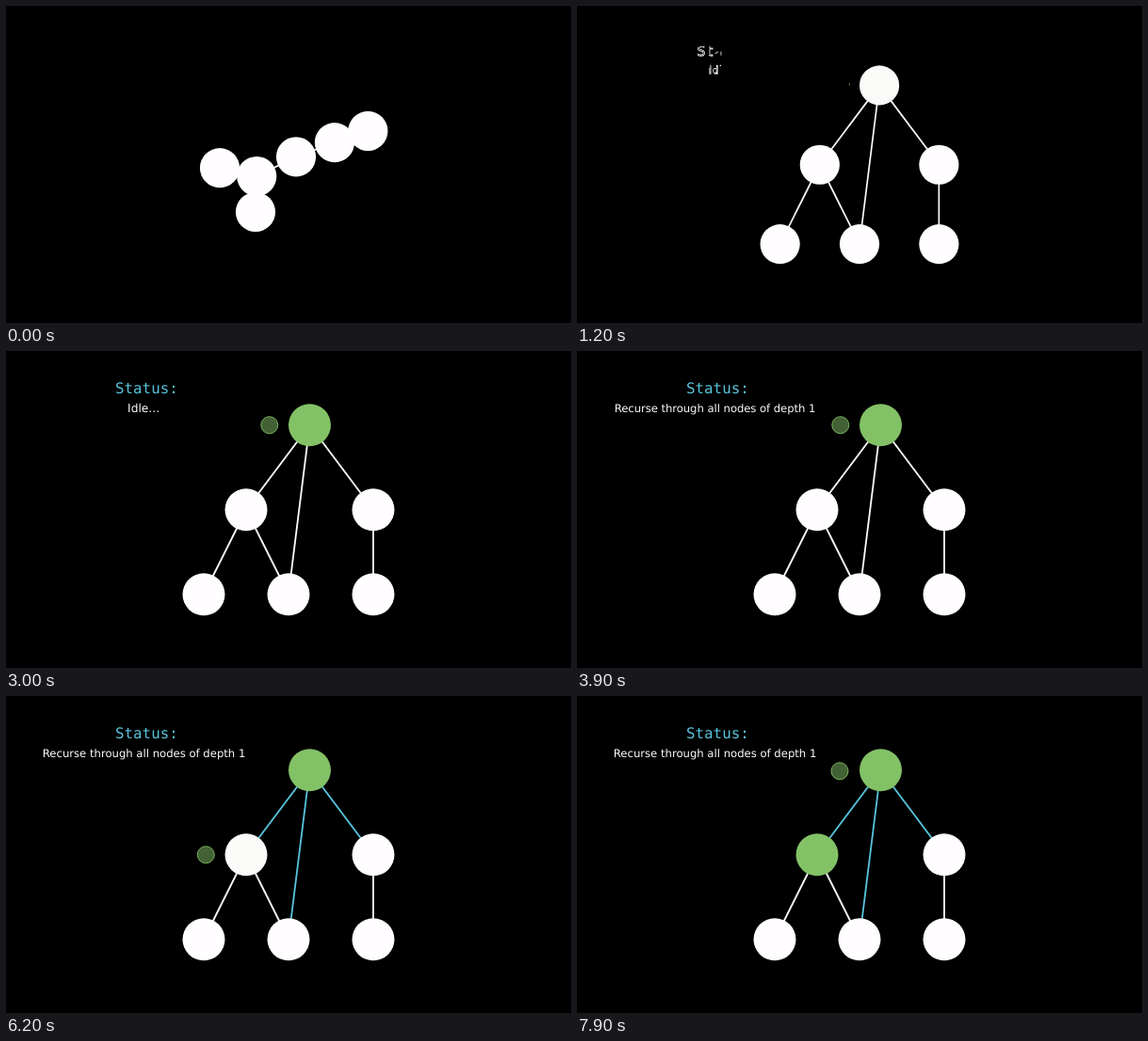
Recreate the animation shown at these times as an HTML page with a canvas. Size 600 px wide and 337 px high, loop 8 s.

```html
<!DOCTYPE html>
<html lang="en">
<head>
<meta charset="utf-8">
<title>Depth-first search</title>
<style>
  html, body { margin: 0; width: 100%; height: 100%; overflow: hidden; background: #000; }
  canvas { display: block; width: 600px; height: 337px; }
</style>
</head>
<body>
<canvas id="stage"></canvas>
<script>
const LOOP = 8000;
const UNIT = 42.1875;
const WHITE = [255, 253, 255], GREEN = [131, 193, 103], BLUE = [88, 196, 221];
const MONO = '"DejaVu Sans Mono", monospace';
const SANS = '"DejaVu Sans", sans-serif';

const canvas = document.getElementById('stage');
const ctx = canvas.getContext('2d');
const dpr = window.devicePixelRatio || 1;
canvas.width = Math.round(600 * dpr);
canvas.height = Math.round(337 * dpr);

// Node: start and end position in units, y up.
const nodes = {
  root:  { from: [0.19, 0.20],   to: [0.5, 2] },
  left:  { from: [-0.80, -0.29], to: [-1, 0] },
  right: { from: [1.16, 0.56],   to: [2, 0] },
  leafA: { from: [-1.73, -0.08], to: [-2, -2] },
  leafB: { from: [-0.83, -1.19], to: [0, -2] },
  leafC: { from: [2.0, 0.85],    to: [2, -2] }
};
const edges = [
  ['left', 'leafA'], ['left', 'leafB'], ['right', 'leafC'],
  ['root', 'left'], ['root', 'right'], ['root', 'leafB']
];

const clamp = v => Math.min(1, Math.max(0, v));
const mix = (a, b, p) => a + (b - a) * p;
const mixAll = (a, b, p) => a.map((v, i) => mix(v, b[i], p));
const rgb = (c, alpha = 1) => `rgba(${c.map(Math.round).join(',')},${alpha})`;

const sigmoid = x => 1 / (1 + Math.exp(-x));
const EDGE = sigmoid(-5);
const smooth = p => clamp((sigmoid(10 * (p - 0.5)) - EDGE) / (1 - 2 * EDGE));

// Progress of a one-second step that begins at the given second.
const linear = (t, second) => clamp(t / 1000 - second);
const step = (t, second) => smooth(linear(t, second));

function makeText(str, size, family, x, y, color) {
  const font = `${size}px ${family}`;
  ctx.font = font;
  const glyphs = [];
  [...str].forEach((ch, i) => {
    if (ch === ' ') return;
    const w = ctx.measureText(ch).width;
    const end = ctx.measureText(str.slice(0, i + 1)).width;
    glyphs.push({ ch, w, x: x + end - w });
  });
  return { str, size, font, x, y, color, glyphs };
}

ctx.textRendering = 'geometricPrecision';
const title = makeText('Status:', 14.85, MONO, -172.5, -115.8, BLUE);
const idle = makeText('Idle...', 11.5, SANS, -160.3, -97, WHITE);
const task = makeText('Recurse through all nodes of depth 1', 10.92, SANS, -244.9, -97, WHITE);

function drawText(text) {
  ctx.font = text.font;
  ctx.fillStyle = rgb(text.color);
  ctx.fillText(text.str, text.x, text.y);
}

// Outline each letter in turn, then let it fill.
const outline = { I: 1.7, l: 1.7, '.': 0.5, ':': 0.5 };
function writeText(text, p) {
  if (p <= 0) return;
  if (p >= 1) return drawText(text);
  const span = 1 + 0.2 * (text.glyphs.length - 1);
  ctx.font = text.font;
  ctx.lineWidth = 0.8;
  text.glyphs.forEach((g, i) => {
    const a = clamp(p * span - 0.2 * i);
    if (a <= 0) return;
    const fill = clamp(2 * a - 1);
    const length = (outline[g.ch] || 3.2) * text.size;
    ctx.setLineDash(a < 0.5 ? [2 * a * length, 1000] : []);
    ctx.strokeStyle = rgb(WHITE, 1 - fill);
    ctx.strokeText(g.ch, g.x, text.y);
    ctx.fillStyle = rgb(text.color, fill);
    ctx.fillText(g.ch, g.x, text.y);
  });
  ctx.setLineDash([]);
}

// Letters of one line spread out and turn into those of another.
function morphText(a, b, p) {
  if (p <= 0) return drawText(a);
  if (p >= 1) return drawText(b);
  let last = -1;
  b.glyphs.forEach((g, i) => {
    const index = Math.floor(i * a.glyphs.length / b.glyphs.length);
    const s = a.glyphs[index];
    const cx = mix(s.x + s.w / 2, g.x + g.w / 2, p);
    const y = mix(a.y, b.y, p);
    if (index !== last) {
      ctx.font = a.font;
      ctx.fillStyle = rgb(a.color, 1 - p);
      ctx.fillText(s.ch, cx - s.w / 2, y);
    }
    ctx.font = b.font;
    ctx.fillStyle = rgb(b.color, p);
    ctx.fillText(g.ch, cx - g.w / 2, y);
    last = index;
  });
}

function drawGraph(t) {
  const move = step(t, 0);
  const at = name => {
    const [x, y] = mixAll(nodes[name].from, nodes[name].to, move);
    return [x * UNIT, -y * UNIT];
  };

  ctx.lineWidth = 0.04 * UNIT;
  for (const [a, b] of edges) {
    const extra = a === 'root' && b === 'leafB';
    const color = a === 'root' ? mixAll(WHITE, BLUE, step(t, 4)) : WHITE;
    ctx.strokeStyle = rgb(color, extra ? move : 1);
    ctx.beginPath();
    ctx.moveTo(...at(a));
    ctx.lineTo(...at(b));
    ctx.stroke();
  }

  const visit = { root: step(t, 1), left: step(t, 6) };
  for (const name in nodes) {
    ctx.fillStyle = rgb(mixAll(WHITE, GREEN, visit[name] || 0));
    ctx.beginPath();
    ctx.arc(...at(name), UNIT / 2, 0, 2 * Math.PI);
    ctx.fill();
  }
}

function drawMarker(t) {
  const grow = step(t, 1);
  if (grow <= 0) return;
  const go = step(t, 5) - step(t, 7);
  const [x, y] = mixAll([-0.45, 2], [-1.95, 0], go);
  ctx.beginPath();
  ctx.arc(x * UNIT, -y * UNIT, 0.2 * UNIT, 0, -2 * Math.PI * grow, true);
  ctx.fillStyle = rgb(GREEN, 0.5);
  ctx.fill();
  ctx.lineWidth = 0.02 * UNIT;
  ctx.strokeStyle = rgb(GREEN);
  ctx.stroke();
}

function draw(t) {
  ctx.setTransform(dpr, 0, 0, dpr, 0, 0);
  ctx.fillStyle = '#000';
  ctx.fillRect(0, 0, 600, 337);

  const zoom = 8 / mix(8, 7.5, step(t, 2));
  ctx.translate(300, 168.75);
  ctx.scale(zoom, zoom);

  drawGraph(t);
  drawMarker(t);
  writeText(title, linear(t, 1));
  if (t < 3000) writeText(idle, linear(t, 1));
  else morphText(idle, task, step(t, 3));
}

const start = performance.now();
function frame() {
  draw((performance.now() - start) % LOOP);
  requestAnimationFrame(frame);
}
frame();
</script>
</body>
</html>
```
